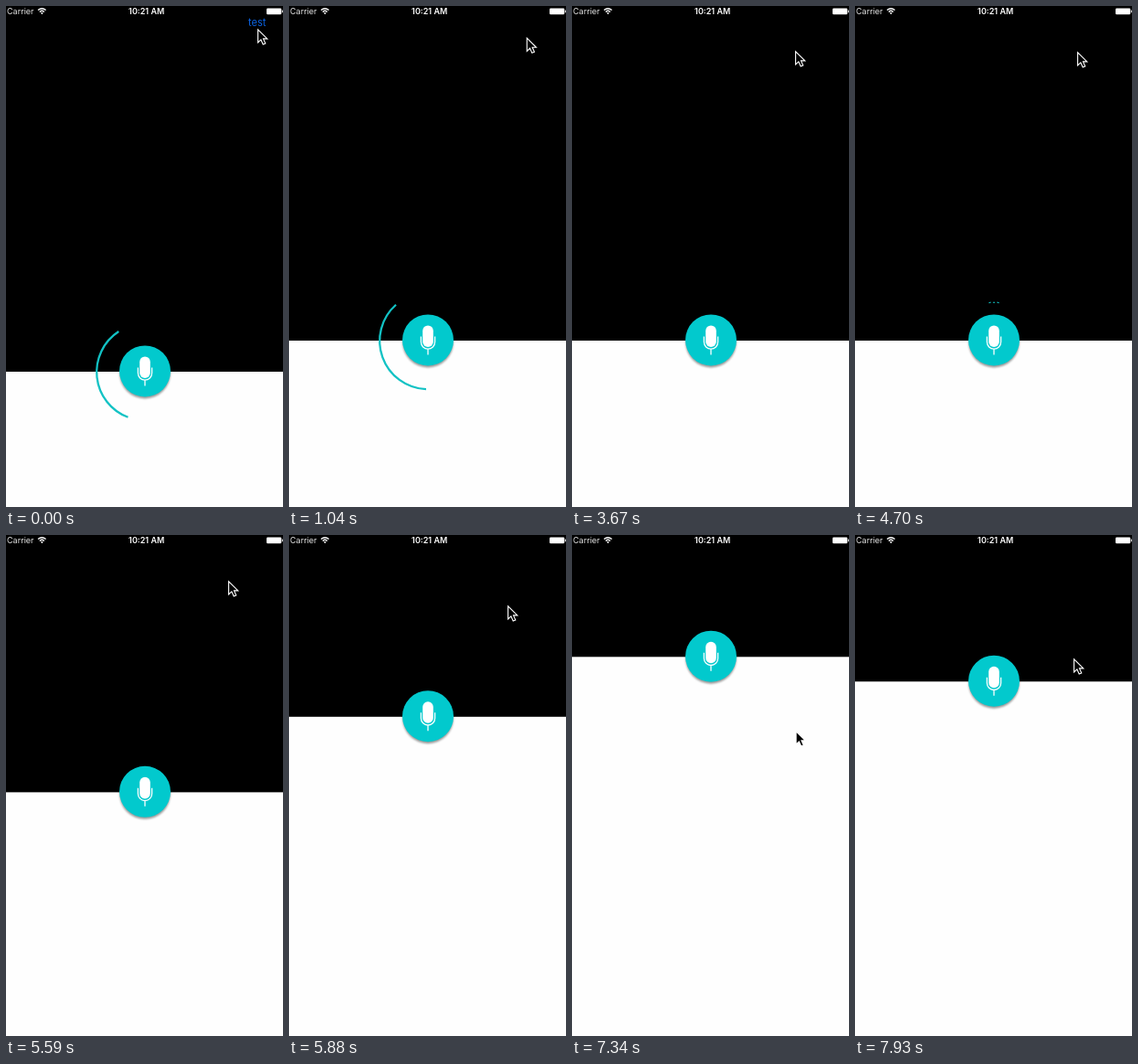
An HTML page that plays this animation: 303 by 548 pixels, repeating every 8 s.

```html
<!DOCTYPE html>
<html lang="en">
<head>
<meta charset="utf-8">
<title>Voice button</title>
<style>
html, body { margin: 0; width: 100%; height: 100%; overflow: hidden; background: #000; }
svg { display: block; width: 100vw; height: 100vh; }
text { font-family: Inter, Roboto, sans-serif; font-size: 9px; fill: #e4e4e4; }
</style>
</head>
<body>
<svg viewBox="0 0 303 548" preserveAspectRatio="none">
  <defs>
    <filter id="blur" x="-20%" y="-20%" width="140%" height="140%"><feGaussianBlur stdDeviation="1.3"/></filter>
  </defs>
  <rect width="303" height="548"/>

  <text x="1" y="9">Carrier</text>
  <g fill="none" stroke="#fff" stroke-width="1.3">
    <path d="M35 4.6Q39.3 .8 43.6 4.6M36.8 6.4Q39.3 4.2 41.8 6.4"/>
    <path d="M39.3 9.2L37.9 7.6Q39.3 6.6 40.7 7.6Z" fill="#fff" stroke="none"/>
  </g>
  <text x="153.7" y="9" text-anchor="middle" font-weight="600" style="fill:#fff">10:21 AM</text>
  <rect x="285" y="2.5" width="16.3" height="6.8" rx="1.2" fill="#fff"/>
  <rect x="301.8" y="4.6" width="1.2" height="2.6" fill="#ccc"/>
  <text id="test" x="265" y="22" style="font-size:11px;fill:#0b62e0">test</text>

  <g id="panel">
    <rect width="303" height="560" fill="#fefefe"/>
    <path id="ring" fill="none" stroke="#12c2c4" stroke-width="2.3"/>
    <circle cx="152" cy="1.6" r="27.8" opacity=".4" filter="url(#blur)"/>
    <g transform="translate(152 -.6)">
      <circle r="28" fill="#02c9cd"/>
      <rect x="-5.8" y="-16" width="11.6" height="23.6" rx="5.8" fill="#fff"/>
      <path d="M-7.6-4V2.2A7.6 7.6 0 0 0 7.6 2.2V-4M0 9.8V16" fill="none" stroke="#fff" stroke-width="1.3"/>
    </g>
  </g>

  <path id="cursor" d="M.6.8V15L3.9 11.9 6.2 17 8.8 15.9 6.5 10.9H10.8Z" stroke="#fff" stroke-width="1.1"/>
</svg>
<script>
const LOOP = 8000, STEP = 146.9;      // picture updates about 6.8 times a second
const CYCLE = 1050, SWEEP = 600, SPARK = 410;
const $ = id => document.getElementById(id);

// [time, x, y] of the pointer tip
const pointer = [
  [150, 275, 25], [1180, 257, 36], [2350, 244, 49], [3670, 244, 49], [4700, 243, 50],
  [5600, 243, 50], [5876, 239, 77], [6165, 232, 126.5], [6465, 232, 126.5], [7000, 252, 275],
  [7345, 244.5, 214], [7490, 243, 182], [7640, 241, 163], [7930, 239, 135]
];
// [time, y] of the panel edge while it is dragged and let go
const drag = [[7080, 182], [7345, 133.3], [7490, 104], [7640, 87], [7930, 160.3]];

function along(keys, t, k) {
  const i = keys.findIndex(p => p[0] > t);
  if (i < 0) return keys[keys.length - 1][k];
  if (!i) return keys[0][k];
  const a = keys[i - 1], b = keys[i];
  return a[k] + (b[k] - a[k]) * (t - a[0]) / (b[0] - a[0]);
}

function ease(t, start, length) {
  const u = Math.min(1, Math.max(0, (t - start) / length));
  return (1 - Math.cos(Math.PI * u)) / 2;
}

function edge(t) {
  if (t > 7080) return along(drag, t, 1);
  return 400 - 34 * ease(t, 150, 880) - 184 * ease(t, 5160, 890);
}

function arc(u) {
  const tail = u ** 1.9, head = 1 - (1 - u) ** 1.8, r = 52.8;
  const at = f => {
    const a = 2 * Math.PI * f;
    return `${152 + r * Math.sin(a)} ${.3 - r * Math.cos(a)}`;
  };
  return `M${at(tail)}A${r} ${r} 0 ${+(head - tail > .5)} 1 ${at(head)}`;
}

function sparks(v) {
  const r = 33 + 18 * Math.sin(Math.PI * v);
  if (r < 40) return "";
  const half = (r - 39) * .175, spread = 4.5 + .39 * (r - 42);
  return [-1, 0, 1].map(s => {
    const at = d => `${152 + s * (spread + .39 * d)} ${.3 - r - d}`;
    return `M${at(-half)}L${at(half)}`;
  }).join("");
}

function ring(t) {
  if (t > 4800) return "";
  const phase = (t + 441) % CYCLE;
  if (phase < SWEEP) return arc(phase / SWEEP);
  const v = (phase - SWEEP) / SPARK;
  return v < 1 ? sparks(v) : "";
}

function draw(now) {
  const t = Math.floor((now % LOOP + 6) / STEP) * STEP;
  $("test").setAttribute("visibility", t < 140 ? "visible" : "hidden");
  $("panel").setAttribute("transform", `translate(0 ${edge(t)})`);
  $("ring").setAttribute("d", ring(t));
  $("cursor").setAttribute("transform", `translate(${along(pointer, t, 1)} ${along(pointer, t, 2)})`);
}

let begin;
function tick(now) {
  begin ??= now;
  draw(now - begin);
  requestAnimationFrame(tick);
}
draw(0);
requestAnimationFrame(tick);
</script>
</body>
</html>
```
